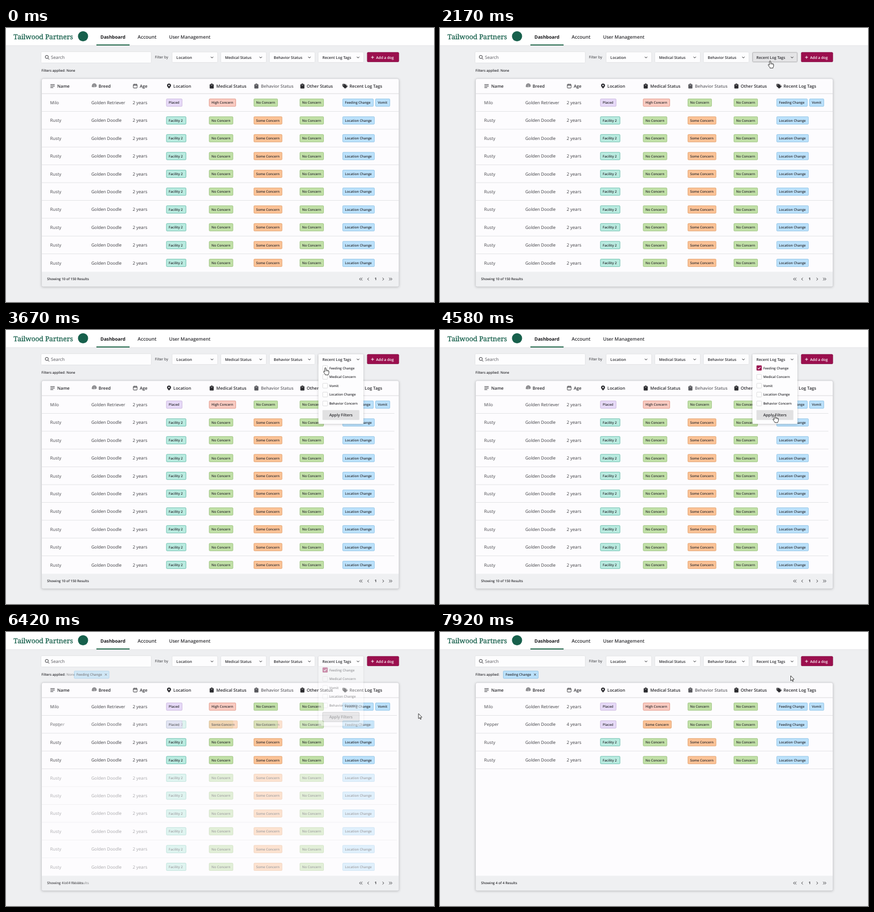
An HTML page for the animation above (8000 ms loop, 800x514 px).

```html
<!DOCTYPE html>
<html lang="en">
<head>
<meta charset="utf-8">
<title>Dog dashboard</title>
<style>
html, body { margin: 0; width: 100%; height: 100%; overflow: hidden; background: #eeeff1; }
svg { display: block; width: 800px; height: 514px; }
text { font-family: "Open Sans", "Noto Sans", sans-serif; text-rendering: geometricPrecision; white-space: pre; }
.brand { font-family: "Noto Serif", serif; }
.soft { filter: drop-shadow(0 1px 2px rgba(0, 0, 0, .2)); }
.faint { filter: drop-shadow(0 .5px 1px rgba(0, 0, 0, .1)); }
</style>
</head>
<body>
<script>
const NS = 'http://www.w3.org/2000/svg';
const LOOP = 8000;
const INK = '#2b2b2f';
const BERRY = '#9b0f4e';
const GREEN = '#17604c';

function el(parent, name, attrs = {}) {
  const node = document.createElementNS(NS, name);
  for (const k in attrs) node.setAttribute(k, attrs[k]);
  parent.appendChild(node);
  return node;
}
const group = (p, attrs) => el(p, 'g', attrs);
const rect = (p, x, y, width, height, fill, more) =>
  el(p, 'rect', { x, y, width, height, fill, ...more });
const path = (p, d, more) =>
  el(p, 'path', { d, fill: 'none', stroke: INK, 'stroke-width': 1, ...more });
function text(p, x, y, str, size, weight = 400, fill = INK, more) {
  const t = el(p, 'text', { x, y, 'font-size': size, 'font-weight': weight, fill, ...more });
  t.textContent = str;
  return t;
}

const svg = el(document.body, 'svg', { viewBox: '0 0 800 514', width: 800, height: 514 });
rect(svg, 0, 0, 800, 514, '#eeeff1');

// Top bar
rect(svg, 0, 0, 800, 32.5, '#fff', { class: 'faint' });
text(svg, 14, 21, 'Tailwood Partners', 12.7, 400, GREEN, { class: 'brand', stroke: GREEN, 'stroke-width': .3 });
el(svg, 'circle', { cx: 144, cy: 15.5, r: 9.5, fill: GREEN });
text(svg, 176.5, 20, 'Dashboard', 8.65, 700, '#151518');
text(svg, 246, 20, 'Account', 9, 600);
text(svg, 304.7, 20, 'User Management', 8.7, 600);
rect(svg, 169, 30.8, 62, 2, '#23694d');

// Search and filters
rect(svg, 66, 45, 205, 20, '#fdfdfe', { rx: 1.5, class: 'faint' });
el(svg, 'circle', { cx: 76.3, cy: 54.3, r: 2.9, fill: 'none', stroke: INK, 'stroke-width': 1 });
path(svg, 'M78.4 56.5l2.5 2.6');
text(svg, 84, 58, 'Search', 8.2, 400, '#55555a');
text(svg, 278.3, 57.3, 'Filter by', 6.7);

function filterLabel(p, x, label) {
  text(p, x + 7.6, 57.6, label, 7, 600);
  path(p, `M${x + 71.8} 53.9l2.3 2.4l2.3-2.4`);
}
['Location', 'Medical Status', 'Behavior Status'].forEach((label, i) => {
  const x = 311 + i * 91;
  rect(svg, x, 45.5, 84, 18.5, '#fdfdfe', { rx: 1.5, class: 'faint' });
  filterLabel(svg, x, label);
});
rect(svg, 675.2, 45.7, 59, 17.8, BERRY, { rx: 1.5, stroke: '#7f0a3e', 'stroke-width': .7 });
path(svg, 'M682.4 55h5.4M685.1 52.3v5.4', { stroke: '#fff' });
text(svg, 691.8, 57.6, 'Add a dog', 6.9, 600, '#fff');

text(svg, 66.3, 82.3, 'Filters applied:', 6.3, 600);
const none = text(svg, 113, 82.3, 'None', 6.3, 600);

// Table frame
rect(svg, 66.5, 95, 668, 390, '#fdfcfe', { rx: 3, stroke: '#cfd0d3', 'stroke-width': .8, class: 'soft' });
path(svg, 'M67 457.3H734V482q0 2.5-2.5 2.5H69.500q-2.500 0-2.500-2.500z', { fill: '#eff0f2', stroke: 'none' });

// Column heads
const clip = x => {
  rect(svg, x - 3.8, 105.6, 7.6, 7.8, x === 468 ? '#58585d' : INK, { rx: 1 });
  rect(svg, x - 1.7, 104.3, 3.4, 2.4, x === 468 ? '#58585d' : INK, { rx: .8 });
  path(svg, `M${x - 1.5} 107.200h3`, { stroke: '#fdfcfe', 'stroke-width': .7 });
};
path(svg, 'M83 106.200h8M83 109h8M83 111.800h5.400');
for (let r = 1; r < 5; r++)
  path(svg, `M${165 - r} ${111.5 - r * .2}v-${2.4}a${r} ${r} 0 0 1 ${2 * r} 0v${2.6 - r * .25}`, { 'stroke-width': .65 });
rect(svg, 238, 105.8, 7, 6.8, 'none', { rx: .8, stroke: INK, 'stroke-width': .9 });
path(svg, 'M238 107.300h7M239.800 104.600v1.500M243.200 104.600v1.500');
path(svg, 'M304.700 113.600Q301 109.600 301 107.900a3.700 3.700 0 0 1 7.400 0Q308.400 109.600 304.700 113.600z', { fill: INK, stroke: 'none' });
el(svg, 'circle', { cx: 304.7, cy: 107.9, r: 1.3, fill: '#fdfcfe' });
[384.5, 468, 554].forEach(clip);
path(svg, 'M629.300 105.200h3.900l4.300 4.300l-3.800 3.800l-4.400-4.400z', { fill: INK, 'stroke-width': .8, 'stroke-linejoin': 'round' });
path(svg, 'M634.600 104.800l4.200 4.500l-3.500 3.800', { 'stroke-width': .7 });
el(svg, 'circle', { cx: 631, cy: 106.9, r: .7, fill: '#fdfcfe' });
[[95.8, 'Name'], [173, 'Breed'], [250, 'Age'], [312.8, 'Location'], [393, 'Medical Status'],
 [476.5, 'Behavior Status'], [562, 'Other Status'], [642, 'Recent Log Tags']]
  .forEach(([x, s]) => text(svg, x, 112, s, 8, 600, s === 'Behavior Status' ? '#66666b' : INK));

// Rows
const TAGS = {
  'Placed': [30, '#e7daf8', '#c3add9'],
  'Facility 2': [37.3, '#b9ebe0', '#58b6a2'],
  'High Concern': [50.3, '#f9cbc1', '#dd8877'],
  'Some Concern': [53.3, '#fbc296', '#dd975d'],
  'No Concern': [45, '#c1e0a7', '#90ba70'],
  'Feeding Change': [58, '#bbe1fb', '#82bce3'],
  'Vomit': [27.5, '#bbe1fb', '#82bce3'],
  'Location Change': [60, '#bbe1fb', '#82bce3']
};
function tag(p, x, y, label) {
  const [w, fill, stroke] = TAGS[label];
  rect(p, x + .4, y - 7, w - .8, 14, fill, { rx: 1.3, stroke, 'stroke-width': .8 });
  text(p, x + 4.6, y + 2.3, label, 6.25, 600);
}
const rowY = i => 140 + i * 33.4;
function row(i, name, breed, age, place, med, behave, logs) {
  const g = group(svg), y = rowY(i);
  text(g, 82.6, y + 3, name, 8.1, 400, '#47474c');
  text(g, 159.4, y + 3, breed, 8.1, 400, '#3a3a3f');
  text(g, 236.8, y + 3, age, 8.2, 400, '#3a3a3f');
  [[299.5, place], [379.5, med], [463, behave], [549, 'No Concern']].forEach(([x, s]) => tag(g, x, y, s));
  logs.forEach((s, k) => tag(g, 629 + k * 61.3, y, s));
  return g;
}
const usual = i => row(i, 'Rusty', 'Golden Doodle', '2 years', 'Facility 2', 'No Concern', 'Some Concern', ['Location Change']);
row(0, 'Milo', 'Golden Retriever', '2 years', 'Placed', 'High Concern', 'No Concern', ['Feeding Change', 'Vomit']);
const leaving = [];
const lines = [];
for (let i = 0; i < 10; i++) {
  if (i) {
    const g = usual(i);
    if (i === 1 || i > 3) leaving.push(g);
  }
  const y = rowY(i) - 16.9;
  const line = el(svg, 'line', { x1: 67, x2: 734, y1: y, y2: y, stroke: i ? '#e3e3e6' : '#d9d9dc', 'stroke-width': 1 });
  if (i) lines.push(line);
  if (i > 4) leaving.push(line);
}
const joining = row(1, 'Pepper', 'Golden Doodle', '4 years', 'Placed', 'Some Concern', 'No Concern', ['Feeding Change']);

// Footer
const allCount = text(svg, 76.8, 473.4, 'Showing 10 of 150 Results', 6.3, 600);
const fewCount = text(svg, 76.8, 473.4, 'Showing 4 of 4 Results', 6.3, 600);
const chev = (x, dir) => path(svg, `M${x - dir * 1.2} 468.500l${dir * 2.4} 2.500l${-dir * 2.4} 2.500`, { 'stroke-width': .9 });
[[661.8, -1], [664.8, -1], [677, -1], [705, 1], [717.3, 1], [720.3, 1]].forEach(a => chev(...a));
text(svg, 690.8, 473.4, '1', 6.6, 700, INK, { 'text-anchor': 'middle' });

// Applied filter chip
const chip = group(svg);
rect(chip, 118.4, 73.2, 65.2, 13.8, '#bbe1fb', { rx: 1.3, stroke: '#82bce3', 'stroke-width': .8 });
text(chip, 122.6, 82.3, 'Feeding Change', 6.25, 600);
path(chip, 'M175.700 78l3.800 3.800M179.500 78l-3.800 3.800', { 'stroke-width': .9 });

// Tag menu
rect(svg, 584, 45.5, 84, 18.5, '#fdfdfe', { rx: 1.5, class: 'faint' });
const menu = group(svg);
rect(menu, 584, 45.5, 84, 130.5, '#fdfdfe', { rx: 1.5, class: 'soft' });
['Feeding Change', 'Medical Concern', 'Vomit', 'Location Change', 'Behavior Concern'].forEach((s, i) => {
  const y = 71.2 + i * 16.65;
  rect(menu, 592, y - 4.5, 9, 9, '#fff', { rx: 1, stroke: '#d3d3d6', 'stroke-width': .8 });
  text(menu, 604.2, y + 2.3, s, 6.2, 600);
});
const check = group(menu);
rect(check, 591.7, 66.4, 9.6, 9.6, BERRY, { rx: 1.2 });
path(check, 'M594 71.300l1.800 1.900l3.400-3.900', { stroke: '#fff', 'stroke-width': 1.1 });
rect(menu, 591.5, 150.3, 69, 18.4, '#e1e1e2', { rx: 1.2 });
const applyHover = rect(menu, 591.9, 150.7, 68.2, 17.6, '#d0d0d1', { rx: 1.2, stroke: '#99999b', 'stroke-width': .8 });
text(menu, 604.2, 162.3, 'Apply Filters', 7.35, 600);
const tagHover = rect(svg, 584.4, 45.9, 83.2, 17.7, '#e4e4e6', { rx: 1.2, stroke: '#a2a2a5', 'stroke-width': .8 });
filterLabel(svg, 584, 'Recent Log Tags');

// Pointer
const pointer = group(svg);
const skin = { fill: '#fff', stroke: '#222', 'stroke-width': .9, 'stroke-linejoin': 'round' };
const arrow = path(pointer, 'M0 0V9.500L2.200 7.600L3.600 10.800L5 10.200L3.600 7.100L6.500 6.900z', skin);
const hand = group(pointer);
path(hand, 'M-1.200 7.600V1Q-1.200-.2 0-.2Q1.200-.2 1.200 1V4.200Q2.400 3.600 3.200 4.600Q4.400 4.100 5 5.200Q6.600 5 6.600 6.600V9Q6.600 10.600 5.400 12V13.200H-.2V12.200Q-2.600 9.800-3.400 7.600Q-3.800 6.200-2.600 6.400z', skin);
path(hand, 'M1.200 4.200v2.400M3.200 4.600v2.200M5 5.200v1.800', { stroke: '#222', 'stroke-width': .6 });

const clamp = v => Math.max(0, Math.min(1, v));
const span = (t, a, b) => clamp((t - a) / (b - a));
const easeOut = v => 1 - (1 - v) ** 2;
const easeIn = v => v * v;
const smooth = v => v * v * (3 - 2 * v);

// Pointer stops: time, x, y and easing on the way there
const STOPS = [
  [1100, 628, 96], [1400, 617, 62], [2900, 617, 62], [3170, 615, 72],
  [3500, 597, 71], [4000, 597, 71], [4450, 626, 160.5], [4960, 626, 160.5],
  [5330, 774.5, 153, easeIn], [5560, 774.5, 153], [5800, 771, 153],
  [7000, 771, 153], [7880, 655.5, 82]
];
function pointerAt(t) {
  let a = STOPS[0];
  for (const b of STOPS) {
    if (t < b[0]) {
      const k = (b[3] || smooth)(span(t, a[0], b[0]));
      return [a[1] + (b[1] - a[1]) * k, a[2] + (b[2] - a[2]) * k];
    }
    a = b;
  }
  return [a[1], a[2]];
}

const show = (node, v) => node.setAttribute('opacity', v.toFixed(3));

function draw(t) {
  const opened = easeOut(span(t, 3000, 3500));
  const done = easeOut(span(t, 6250, 6750));
  const open = opened * (1 - done);

  show(menu, open);
  show(check, +(t >= 3850));
  show(applyHover, span(t, 4640, 4800));
  show(tagHover, t < 1300 ? 0 : 1 - span(t, 2830, 3080));
  lines.forEach(l => l.setAttribute('x2', 734 - 8 * open));

  leaving.forEach(n => show(n, 1 - done));
  show(joining, done);
  show(none, 1 - done);
  show(allCount, 1 - done);
  show(fewCount, done);
  show(chip, done);
  chip.setAttribute('transform', `translate(${21 * (1 - done)} 0)`);

  const [x, y] = pointerAt(t);
  const pointing = (t >= 1300 && t < 2980) || (t >= 3400 && t < 5700);
  pointer.setAttribute('transform', `translate(${x} ${y})`);
  show(pointer, +(t >= 1100));
  show(hand, +pointing);
  show(arrow, +!pointing);
}

const start = performance.now();
function tick() {
  draw((performance.now() - start) % LOOP);
  requestAnimationFrame(tick);
}
tick();
</script>
</body>
</html>
```
